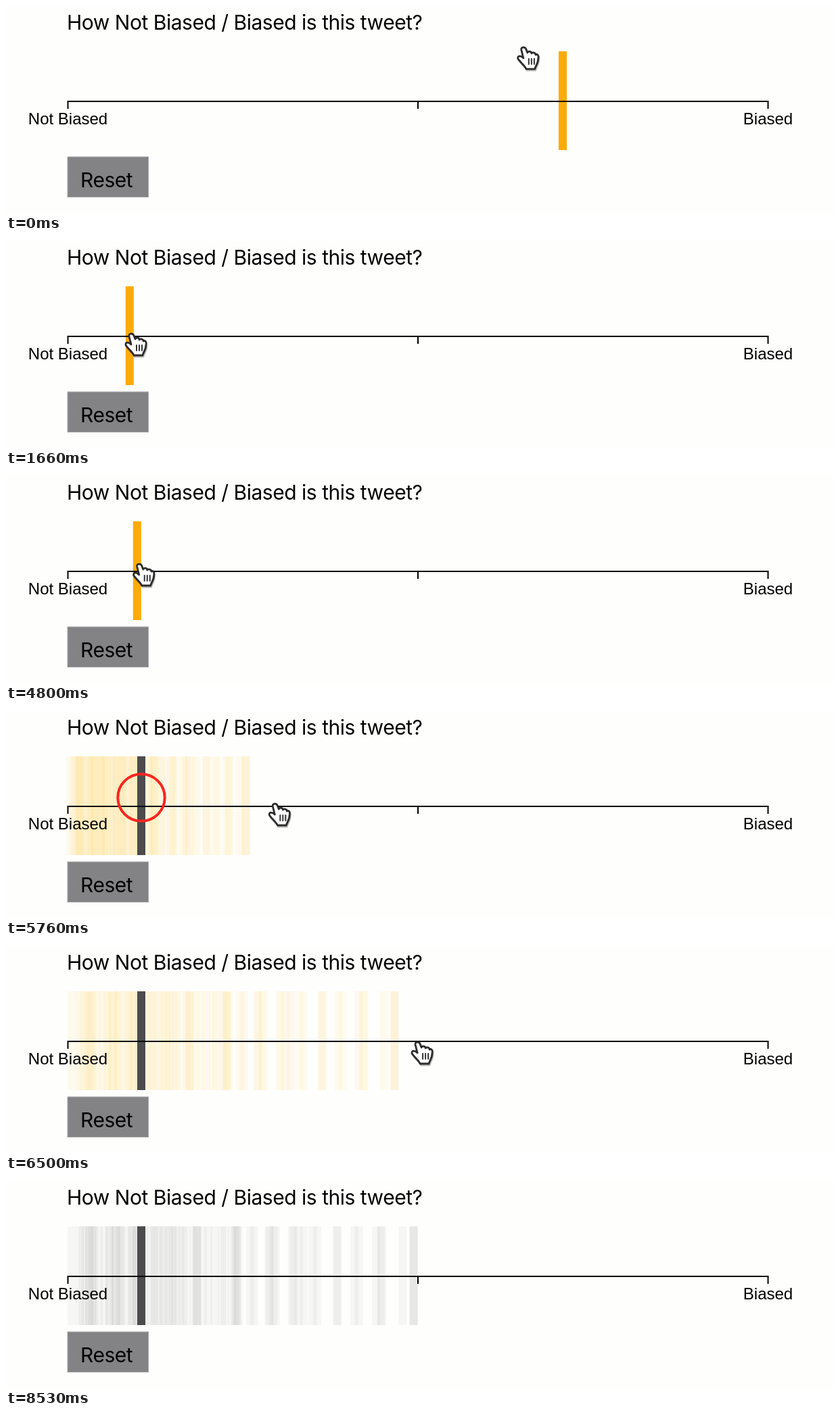
An HTML page that plays this animation: 1224x306 px, repeating every 9500 ms.

```html
<!DOCTYPE html>
<html lang="en">
<head>
<meta charset="utf-8">
<title>Bias slider</title>
<style>
  html, body { margin: 0; width: 100%; height: 100%; overflow: hidden; background: #fefefd; }
  svg { display: block; width: 1224px; height: 306px; }
  .ui { font: 30px Inter, sans-serif; letter-spacing: -.48px; }
  .label { font: 24px "Liberation Sans", Arial, sans-serif; text-anchor: middle; }
</style>
</head>
<body>
<svg viewBox="0 0 1224 306">
  <text class="ui" x="90" y="35">How Not Biased / Biased is this tweet?</text>
  <rect x="91" y="223" width="119.5" height="59.5" fill="#838284" stroke="#a9a8aa"/>
  <text class="ui" x="110" y="268">Reset</text>
  <g id="strips"></g>
  <rect id="bar" y="67" width="12" height="146"/>
  <path d="M91.5 152V141H1126.5V152M609 141V152" fill="none" stroke="#000" stroke-width="2"/>
  <text class="label" x="91.5" y="175">Not Biased</text>
  <text class="label" x="1126.5" y="175">Biased</text>
  <circle id="ring" fill="none" stroke="#f8261f" stroke-width="4"/>
  <defs>
    <path id="palm" d="M-3 4C-4 -1 3 -1 4 3L6 8C8 5 12 6 12 9C14 7 18 8 18 11C21 9 23 13 22 16C22 22 20 25 18 29L17 32H4C3 28 -3 24 -8 17C-9 12 -4 12 0 16Z"/>
  </defs>
  <g id="hand" stroke-width="2.8" stroke-linejoin="round" stroke-linecap="round">
    <use href="#palm" stroke="#000" opacity=".25" x="1" y="2"/>
    <use href="#palm" fill="#fff" stroke="#2c2c2c"/>
    <path d="M8 17V25M12 17V25M16 17V25" stroke="#333" stroke-width="2"/>
  </g>
</svg>
<script>
const LOOP = 9500, REVEAL = 5160, SETTLE = 6730, CLICK = 7260, LEAVE = 8200;
const RING_TIME = 1270, LAG = 60, COUNT = 77;
const WARM = ["#ffd34d", "#ffbd68", "#ffe27a"], DARK = "#4d4b4d";
const $ = id => document.getElementById(id);
const set = (el, attrs) => { for (const k in attrs) el.setAttribute(k, attrs[k]); };
const easeOut = u => 1 - (1 - u) ** 1.5;

// Fingertip at key moments: time, x, y
const keys = [
  [-290, 938, 35], [640, 193, 147], [700, 193, 147], [1250, 151, 141],
  [1660, 185, 137], [2770, 189, 135], [3030, 203, 131], [3350, 203, 131],
  [3860, 179, 130], [4530, 185, 130], [4930, 200, 130], [5160, 200, 130],
  [5760, 397, 137], [6500, 608, 142], [6730, 625, 144], [7500, 625, 144],
  [LEAVE, 1061, 126]
];

// Monotone cubic through the keys: no overshoot, rests stay still
function slope(i, c) {
  const a = keys[i], b = keys[i + 1];
  return a && b ? (b[c] - a[c]) / (b[0] - a[0]) : 0;
}
function tangent(i, c) {
  const p = slope(i - 1, c), q = slope(i, c);
  return p * q > 0 ? 2 * p * q / (p + q) : 0;
}
function pointer(t) {
  t = Math.min(t, LEAVE - 1);
  const i = keys.findIndex(k => k[0] > t) - 1;
  const a = keys[i], b = keys[i + 1], h = b[0] - a[0], u = (t - a[0]) / h, v = 1 - u;
  return [1, 2].map(c =>
    v * v * (1 + 2 * u) * a[c] + u * u * (1 + 2 * v) * b[c] +
    h * u * v * (v * tangent(i, c) - u * tangent(i + 1, c)));
}

let seed = 4711;
const random = () => (seed = seed * 16807 % 2147483647) / 2147483647;

// Other answers: even on the left, thinning out towards the middle
const strips = Array.from({ length: COUNT }, (_, i) => {
  const u = Math.min(1, i / (COUNT - 1) + .04 * random());
  const el = document.createElementNS("http://www.w3.org/2000/svg", "rect");
  set(el, { y: 67, width: 12, height: 146 });
  $("strips").append(el);
  return { el, x: 91 + 506 * (.6 * u + .4 * u ** 5), color: WARM[i % 3] };
});

function drawRing(t) {
  const second = t >= CLICK;
  const u = (t - (second ? CLICK : REVEAL)) / RING_TIME;
  const on = u >= 0 && u < 1;
  set($("ring"), {
    cx: second ? 626 : 200, cy: second ? 142 : 128,
    r: on ? 10 + 40 * easeOut(u) : 0,
    opacity: on ? Math.min(1, (1 - u) * 4) : 0
  });
}

function drawStrips(t) {
  const shown = t >= REVEAL, grey = t >= CLICK;
  set($("strips"), { visibility: shown ? "visible" : "hidden" });
  if (!shown) return;
  const k = easeOut(Math.min(1, (t - REVEAL) / (SETTLE - REVEAL)));
  for (const { el, x, color } of strips) set(el, {
    x: 85 + (x - 85) * k,
    fill: grey ? DARK : color,
    opacity: grey ? .045 : .09
  });
}

function draw(t) {
  const [x, y] = pointer(t), locked = t >= REVEAL;
  set($("bar"), {
    x: locked ? 194 : pointer(t - LAG)[0] - 6,
    fill: locked ? DARK : "#fdab08"
  });
  set($("hand"), {
    transform: `translate(${x} ${y})`,
    visibility: t < LEAVE ? "visible" : "hidden"
  });
  drawStrips(t);
  drawRing(t);
}

const start = performance.now();
function frame() {
  draw((performance.now() - start) % LOOP);
  requestAnimationFrame(frame);
}
frame();
</script>
</body>
</html>
```
